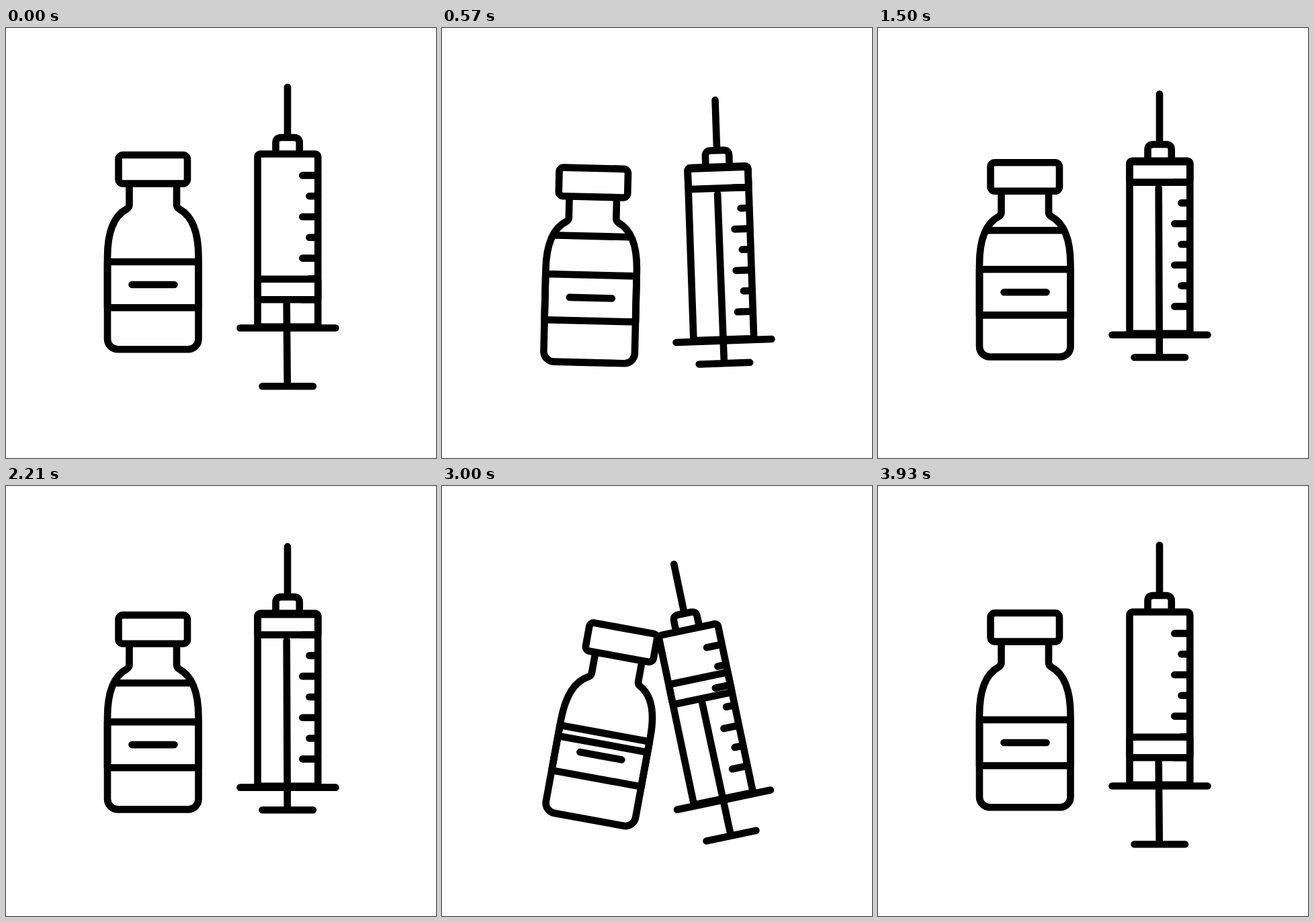
Animation, 640 px wide and 640 px high, one loop 4 s. Source, as an HTML page:

```html
<!DOCTYPE html>
<html lang="en">
<head>
<meta charset="utf-8">
<title>Vial and syringe</title>
<style>
  html, body { margin: 0; width: 100%; height: 100%; overflow: hidden; background: #fff; }
  svg { display: block; width: 100vw; height: 100vh; }
  g { fill: none; stroke: #000; stroke-width: 10.6; stroke-linecap: round; stroke-linejoin: round; }
</style>
</head>
<body>
<svg viewBox="0 0 640 640">
  <defs>
    <path id="glass" d="M183.5 234V263Q183.5 267 179.5 269.5C160 280 151 305 151 341V463A15.5 15.3 0 0 0 166.5 478.3H271A15.5 15.3 0 0 0 286.5 463V341C286.5 305 277.5 280 258 269.5Q254 267 254 263V234"/>
    <clipPath id="inside"><use href="#glass"/></clipPath>
  </defs>
  <g id="vial">
    <rect x="167.5" y="189" width="102.5" height="42.6" rx="6.5"/>
    <use href="#glass"/>
    <path d="M151 348H286.5V416.2H151ZM187.5 382H250.5"/>
    <g clip-path="url(#inside)"><path id="level" d="M140 0H298"/></g>
  </g>
  <g id="syringe">
    <path d="M419 88V160M401.5 185V171Q401.5 163 409.5 163H428.8Q436.8 163 436.8 171V185"/>
    <rect x="374.5" y="187.5" width="89.8" height="257.2" rx="4"/>
    <path id="ticks"/>
    <path d="M348.5 446.5H490.5"/>
    <rect id="piston" x="374.5" width="89.8" height="30.4" rx="3"/>
    <path id="rod"/>
  </g>
</svg>
<script>
const LOOP = 4000, FPS = 14;
const REFILL = 2714;  // start of the second half
const LAG = 90;       // the vial follows the syringe
const DEPTH = 21.4;

const $ = id => document.getElementById(id);
const clamp = u => Math.min(1, Math.max(0, u));
const smooth = u => u * u * (3 - 2 * u);
const ramp = (t, from, to) => smooth(clamp((t - from) / (to - from)));

// Quick dip, then a return to rest over the given length
function dip(t, length, bend, power) {
  const down = 1 - (1 - clamp(t / 320)) ** 2;
  return DEPTH * down * (1 - clamp(t / length) ** bend) ** power;
}

// Sine wobble that fades out within a second
function wobble(t, angle, half, fade) {
  const u = clamp(t / 1000);
  return angle * Math.sin(Math.PI * t / half) * (1 - u) ** fade;
}

const drop = t => t < REFILL ? dip(t, 2500, 1.7, 1.365) : dip(t - REFILL, 1150, 4, 5.2);
const tilt = t => t < REFILL ? wobble(t, 19.1, 428, 2.5) : -wobble(Math.max(0, t - REFILL - 72), 15.1, 432, 1);
const push = t => ramp(t, 80, 500) - ramp(t, REFILL + 136, REFILL + 486);

function pose(id, y, angle, pivot) {
  $(id).setAttribute('transform', `translate(0 ${y}) rotate(${angle} ${pivot})`);
}

function draw(t) {
  const late = (t - LAG + LOOP) % LOOP, p = push(t);
  const handle = 533.3 - 53.2 * p;
  pose('vial', drop(late), -tilt(late), '218.75 478.3');
  pose('syringe', drop(t), tilt(t), '419 446.5');
  $('level').setAttribute('transform', `translate(0 ${478.3 - 188.2 * p})`);
  $('piston').setAttribute('y', 373.8 - 184.8 * p);
  $('rod').setAttribute('d', `M417.7 ${409 - 181 * p}L418.8 ${handle}M381.5 ${handle}H457`);
}

$('ticks').setAttribute('d', Array.from({ length: 7 }, (_, i) =>
  `M${i % 2 ? 451.5 : 441.3} ${219.4 + i * 30.8}H464`).join(''));

function tick(now) {
  const step = Math.floor((now % LOOP + 5) * FPS / 1000);
  draw(step * 1000 / FPS % LOOP);
  requestAnimationFrame(tick);
}
draw(0);
requestAnimationFrame(tick);
</script>
</body>
</html>
```
